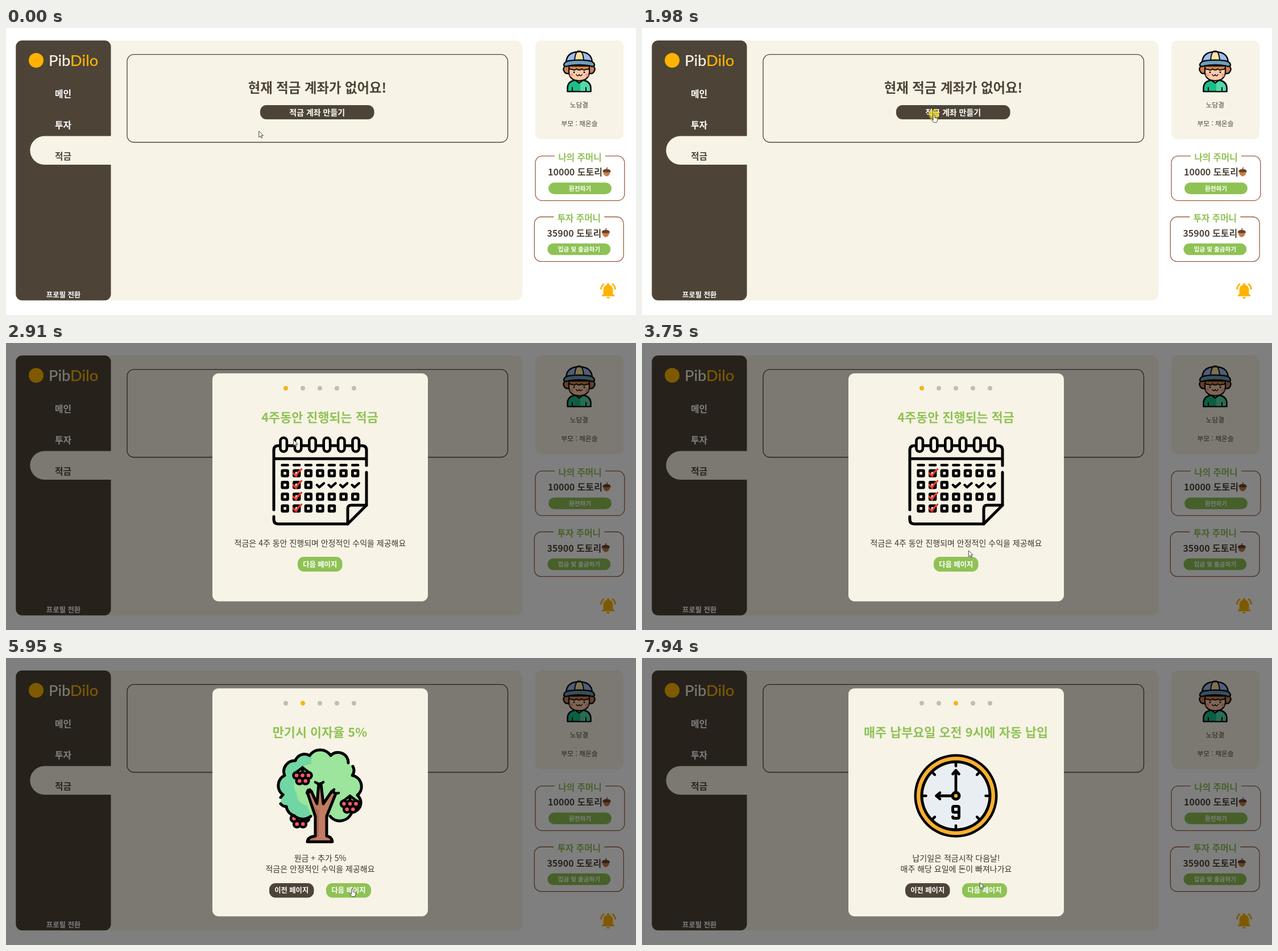
Recreate the animation shown at these times as an HTML page. Size 1108x506 px, loop 8 s.

```html
<!DOCTYPE html>
<html lang="ko">
<head>
<meta charset="utf-8">
<title>적금</title>
<style>
html, body { margin: 0; width: 100%; height: 100%; overflow: hidden; background: #fff; }
svg { display: block; width: 100%; height: 100%; }
text { font-family: "Noto Sans CJK KR", "Noto Sans CJK", sans-serif; text-anchor: middle; }
.logo { font-family: Lato, sans-serif; font-weight: 500; text-anchor: start; }
</style>
</head>
<body>
<svg id="stage" viewBox="0 0 1108 506"></svg>
<script>
const CREAM = '#f7f3e6', DARK = '#4d4437', GREEN = '#8fc255', AMBER = '#ffb300';

const rect = (x, y, x2, y2, r, attrs) =>
  `<rect x="${x}" y="${y}" width="${x2 - x}" height="${y2 - y}" rx="${r}" ${attrs}/>`;
const fill = (x, y, x2, y2, r, color) => rect(x, y, x2, y2, r, `fill="${color}"`);
const circle = (x, y, r, color, more = '') => `<circle cx="${x}" cy="${y}" r="${r}" fill="${color}" ${more}/>`;
const line = (d, w, color = '#000', inside = 'none') =>
  `<path d="${d}" fill="${inside}" stroke="${color}" stroke-width="${w}" stroke-linecap="round" stroke-linejoin="round"/>`;
const shape = (d, color) => `<path d="${d}" fill="${color}"/>`;
// y is the middle of the line of text
const label = (s, x, y, size, color = DARK, weight = 700) =>
  `<text x="${x}" y="${y + size * .38}" font-size="${size}" font-weight="${weight}" fill="${color}">${s}</text>`;
const group = (id, body) => `<g id="${id}">${body}</g>`;

const pill = (s, x, y, x2, y2, color, size) =>
  fill(x, y, x2, y2, Math.min(11, (y2 - y) / 2), color) + label(s, (x + x2) / 2, (y + y2) / 2, size, '#fff');

function acorn(x, y) {
  return shape(`M${x - 6.2} ${y - .5}q0 6.5 6.2 8.5q6.2 -2 6.2 -8.5z`, '#c87d45') +
    shape(`M${x - 7.2} ${y}q0 -5 7.2 -5t7.2 5q-7.2 1.4 -14.4 0z`, '#6a422c') +
    line(`M${x} ${y - 4.5}q0 -2 1 -3`, 1.5, '#6a422c');
}

function pocket(x, y, name, amount, action) {
  return rect(x, y, x + 156.8, y + 78.7, 12, 'fill="none" stroke="#9a5c3e" stroke-width="1.3"') +
    fill(x + 34, y - 3, x + 123, y + 3, 0, '#fff') +
    label(name, x + 78.5, y + 2, 15.6, GREEN) +
    label(amount + ' 도토리', x + 70, y + 28.5, 16) +
    acorn(x + 125.5, y + 28) +
    pill(action, x + 23, y + 46.7, x + 134, y + 67.2, GREEN, 10.6);
}

function avatar() {
  const o = '#0b0b12';
  return line('M987.5 112V105q1 -11 13 -13h15q12 2 13 13v7z', 2.6, o, '#18c087') +
    shape('M1010 94h6q10 2 11 12v5h-17z', '#52d9a6') +
    line('M996 112v-7M1020 112v-7', 2, o) +
    line('M1000 91l8 6 8 -6', 2.4, o, '#fcc9a2') +
    line('M984 66q-6 6 -2 11 2 4 7 3l38 0q5 1 7 -3 4 -5 -2 -11z', 2.4, o, '#d08148') +
    line('M990 70h36v9q-2 14 -18 14t-18 -14z', 2.2, o, '#fdcba8') +
    line('M990 67q0 7 6 6 4 3 7 -1 5 4 10 0 3 4 7 1 6 1 6 -6z', 1.8, o, '#d08148') +
    circle(994.5, 83, 3, '#f9a08f') + circle(1021.5, 83, 3, '#f9a08f') +
    circle(999, 78, 1.5, o) + circle(1017, 78, 1.5, o) +
    line('M1003 82q2.5 5 5 0q2.5 5 5 0', 1.6, o) +
    line('M985 61q1 -19 23 -19t23 19z', 2.4, o, '#9dbff0') +
    line('M1000 60q0 -12 4 -18h8q4 6 4 18z', 2, o, '#fae2a0') +
    line('M981 66q0 -6 8 -8 19 -3 38 0 8 2 8 8 -3 3 -7 1 -20 -4 -40 0 -4 2 -7 -1z', 2.4, o, '#6c9fbb') +
    line('M1005.5 41h5', 2.4, o);
}

function page() {
  return fill(0, 0, 1108, 506, 0, '#fff') +
    fill(17.3, 22, 908.3, 480.3, 12, CREAM) + fill(17.3, 22, 184.5, 480.3, 11, DARK) +
    shape('M185 190.5H67.5a25.2 25.2 0 0 0 0 50.4H185z', CREAM) +
    circle(53, 57, 13, AMBER) +
    `<text class="logo" x="75" y="66.5" font-size="27.3" fill="${CREAM}">Pib<tspan fill="${AMBER}">Dilo</tspan></text>` +
    label('메인', 100.5, 116, 15.8, '#fff') + label('투자', 100.5, 171, 15.8, '#fff') +
    label('적금', 100.5, 226, 15.8) + label('프로필 전환', 101, 470.5, 12.4, '#fff') +
    rect(213, 46.7, 882.5, 201.5, 12, `fill="none" stroke="${DARK}" stroke-width="1.3"`) +
    group('empty', label('현재 적금 계좌가 없어요!', 547.5, 105, 23.4) +
      pill('적금 계좌 만들기', 447, 136, 647.5, 161, DARK, 14)) +
    fill(931, 22, 1086, 196, 10, CREAM) + avatar() +
    label('노담결', 1008, 136, 11.7, DARK, 400) + label('부모 : 채온슬', 1008.5, 168.5, 11.8, DARK, 400) +
    pocket(931, 225.7, '나의 주머니', '10000', '환전하기') +
    pocket(929.3, 333, '투자 주머니', '35900', '입금 및 출금하기') +
    '<g transform="translate(1042.2 446.3) scale(1.4)">' + shape('M7.6 4.1 6.2 2.7A10.3 10.3 0 0 0 2 10.5h2a8.4 8.4 0 0 1 3.6-6.4zM20 10.5h2a10.3 10.3 0 0 0-4.2-7.8l-1.4 1.4a8.4 8.4 0 0 1 3.6 6.4zM18 11c0-3.1-1.6-5.6-4.5-6.3V4a1.5 1.5 0 0 0-3 0v.7C7.6 5.4 6 7.9 6 11v5l-2 2v1h16v-1l-2-2zM12 22a2 2 0 0 0 2-2h-4a2 2 0 0 0 2 2z', AMBER) + '</g>';
}

function calendar() {
  let s = line('M471 294V189q0 -8 8 -8H626q8 0 8 8V216M634 228V286L601 319H479q-8 0 -8 -8V306M471 204H634', 5) +
    line('M601 319V292q0 -6 6 -6H634', 5);
  for (let i = 0; i < 6; i++)
    s += rect(482.5 + i * 25.4, 167, 493.9 + i * 25.4, 191.5, 5.7, `fill="${CREAM}" stroke="#000" stroke-width="4.6"`);
  for (let c = 0; c < 7; c++) {
    const x = 490.6 + c * 20.6;
    s += line(`M${x - 5} 215.3h10`, 4.4);
    for (let r = 0; r < 4; r++) {
      const y = 229.6 + r * 20.7;
      if (r === 3 && c > 4) continue;
      s += r === 1 && c > 2 ? line(`M${x - 5.5} ${y}l4 4 8 -7`, 4.4)
        : rect(x - 4.8, y - 4.8, x + 4.8, y + 4.8, .8, 'fill="none" stroke="#000" stroke-width="4.8"');
      if (c === 1) s += line(`M${x - 6} ${y}l5 5q3 -7 9.5 -12`, 3.2, '#ee3a2c');
    }
  }
  return s;
}

function berries(x, y, stem) {
  const spots = [[-10.5, 0], [0, 0], [10.5, 0], [-5.3, 9.7], [5.3, 9.7]];
  return (stem ? line(`M${x} ${y - 14}L${x - 13} ${y - 4}M${x} ${y - 14}L${x + 13} ${y - 4}M${x} ${y - 14}v8`, 4.6) : '') +
    spots.map(([a, b]) => circle(x + a, y + b, 7.8, '#000')).join('') +
    spots.map(([a, b]) => circle(x + a, y + b, 3.3, '#ff5a68')).join('');
}

function tree() {
  const crown = 'M487 241A20 20 0 0 1 490 207A19 19 0 0 1 509 181A17 17 0 0 1 534 172A22 22 0 0 1 571 172A18 18 0 0 1 602 185';
  const right = 'M610 191A15 15 0 0 1 609 207A20 20 0 0 1 618 242A17 17 0 0 1 608 272A22 22 0 0 1 570 279';
  const left = 'M536 279A22 22 0 0 1 507 278A19 19 0 0 1 493 262';
  return berries(517, 283, false) +
    shape(crown + 'L610 191' + right.slice(8) + 'L536 279' + left.slice(8) + 'L482 257Z', '#9be59d') +
    shape('M487 241A20 20 0 0 1 490 207A19 19 0 0 1 509 181A17 17 0 0 1 534 172L543 166Q535 175 537 187Q520 187 515 204Q500 222 511 238Q512 257 529 260L538 281A22 22 0 0 1 507 278A19 19 0 0 1 493 262L482 257Z', '#70d6a3') +
    line(crown, 5) + line(right, 5) + line(left, 5) + line('M483 246l4 -5M483 257q4 5 10 5', 5) +
    line('M530 324Q531 315 544 314V279L530 237 537 235 547 257 550 222H554L558 257 573 235 580 239 564 279V314Q573 315 574 324Z', 5, '#000', '#c17c62') +
    shape('M547 278l-7 -21 10 14 3 -22 -3 34V314q-4 5 -15 7 3 -4 12 -5z', '#a96a57') +
    line('M529 238l2 -5M537 235l-3 -3M544 219l7 4 7 -4M574 235l3 -3M580 239l5 -1', 4.6) +
    berries(521.5, 207, true) + berries(605, 257, true);
}

function clock() {
  let s = circle(552, 243, 73.5, '#000') + circle(552, 243, 69, '#fbb02f') +
    circle(552, 243, 62.5, '#000') + circle(552, 243, 57.5, '#e9eef3');
  for (let a = 0; a < 360; a += 45)
    s += `<path d="M552 186v4.5" transform="rotate(${a} 552 243)" stroke="#000" stroke-width="4.6" stroke-linecap="round"/>`;
  return s + line('M552 243V199M546.5 204.5L552 198l5.5 6.5M552 243H518M524 237.5L517.5 243l6.5 5.5', 4.8) +
    circle(552, 243, 8.5, '#000') + circle(552, 243, 3.2, '#fbb02f') +
    line('M557 272H549q-2.5 0 -2.5 -2.5V264q0 -2.5 2.5 -2.5H555q2.5 0 2.5 2.5V280q0 2.5 -2.5 2.5H549q-2.5 0 -2.5 -2.5', 5);
}

const heading = s => label(s, 552, 130.5, 21.8, GREEN);
const body = (s, y) => label(s, 552.5, y, 14, '#3c352b', 400);
const pair = pill('이전 페이지', 463, 397, 541.5, 422.5, DARK, 12.3) +
  pill('다음 페이지', 563, 397, 642, 422.5, GREEN, 12.3);

function modal() {
  let dots = '';
  for (let i = 0; i < 5; i++) dots += `<circle class="dot" cx="${492 + i * 30}" cy="79.7" r="4"/>`;
  return fill(0, 0, 1108, 506, 0, 'rgba(0,0,0,.5)') + fill(363, 53.4, 742, 455.5, 11, CREAM) + dots +
    group('page1', heading('4주동안 진행되는 적금') + group('foot',
      body('적금은 4주 동안 진행되며 안정적인 수익을 제공해요', 352.5) +
      pill('다음 페이지', 513, 377, 591.5, 403, GREEN, 12.3))) +
    group('page2', heading('만기시 이자율 5%') + body('원금 + 추가 5%', 352.5) +
      body('적금은 안정적인 수익을 제공해요', 372) + pair) +
    group('page3', heading('매주 납부요일 오전 9시에 자동 납입') + body('납기일은 적금시작 다음날!', 352.5) +
      body('매주 해당 요일에 돈이 빠져나가요', 372) + pair) +
    '<clipPath id="shown"><rect id="loaded" x="460" y="150" width="190" height="0"/></clipPath>' +
    `<g clip-path="url(#shown)">${group('pic1', calendar())}${group('pic2', tree())}${group('pic3', clock())}</g>`;
}

const $ = id => document.getElementById(id);
$('stage').innerHTML = page() + group('modal', modal()) +
  circle(0, 0, 9, '#ffe800', 'id="ring" opacity=".6"') +
  group('arrow', line('M.3 .3V10.6L2.8 8.4 4.5 12 6.2 11.2 4.5 7.7H7.6Z', .9, '#333', '#fff')) +
  group('hand', line('M-1.4 9V1.3a1.4 1.4 0 0 1 2.8 0V5.2l3.4 .8q1.6 .5 1.4 2l-.5 3 -1 2.6H-.3L-3.8 9.8q-.3 -1.8 1.2 -1.3z', .9, '#333', '#fff'));
const dots = document.querySelectorAll('.dot');
const show = (id, on) => { $(id).style.display = on ? '' : 'none'; };
const place = (id, x, y) => $(id).setAttribute('transform', `translate(${x} ${y})`);

// first step, last step, number of steps, points passed
const moves = [
  [190, 390, 4, [459, 192]],
  [720, 1060, 6, [457, 188], [474, 172], [496, 156]],
  [1380, 1450, 2, [513.5, 153]],
  [2450, 2580, 3, [508, 163]],
  [2910, 3690, 12, [500, 186], [548, 232], [611, 290], [575, 348]],
  [3750, 4020, 5, [574, 366], [573, 380], [572, 386], [571, 389], [571, 390]],
  [5550, 5950, 7, [609, 407]],
  [7420, 7940, 8, [602, 392], [597, 388], [594, 396]]
];

function pointer(t) {
  let at = [444.5, 182];
  for (const [from, to, steps, ...points] of moves) {
    if (t < from) break;
    const done = Math.min(steps, 1 + Math.floor((t - from) / (to - from) * (steps - 1) + 1e-6));
    const u = done / steps * points.length, path = [at, ...points];
    const i = Math.min(points.length - 1, Math.floor(u)), k = u - i;
    at = path[i].map((v, j) => v + (path[i + 1][j] - v) * k);
  }
  return at;
}

// button that turns the pointer into a hand
function target(t) {
  if (t < 2120) return [447, 136, 647, 161];
  if (t < 2450) return [513, 210, 591, 236];
  if (t < 4820) return [513, 377, 591, 403];
  return [563, 397, 642, 422];
}

// visible lower edge of the picture while it loads
const loads = [[2120, 150], [2450, 215], [2515, 268], [2580, 340], [4890, 266.5], [4950, 340], [7020, 262], [7090, 340]];

function draw(t) {
  const step = t < 2120 ? 0 : t < 4820 ? 1 : t < 6950 ? 2 : 3;
  const pic = t < 4890 ? 1 : t < 7020 ? 2 : 3;
  show('modal', step > 0);
  show('empty', step === 0);
  for (let i = 1; i < 4; i++) {
    show('page' + i, i === step);
    show('pic' + i, i === pic);
  }
  dots.forEach((d, i) => d.setAttribute('fill', i === step - 1 ? '#f6b31a' : '#c3bdb1'));
  place('foot', 0, t < 2450 ? -167 : 0);
  let edge = 150;
  for (const [at, y] of loads) if (t >= at) edge = y;
  $('loaded').setAttribute('height', edge - 150);

  const [x, y] = pointer(t), [x1, y1, x2, y2] = target(t);
  const over = x >= x1 && x <= x2 && y >= y1 && y <= y2;
  show('hand', over);
  show('arrow', !over);
  place('hand', x, y);
  place('arrow', x, y);
  place('ring', x, y);
  show('ring', t >= 1980 && t < 2120 || t >= 4620 && t < 4820);
}

const start = performance.now();
function tick() {
  draw((performance.now() - start) % 8000);
  requestAnimationFrame(tick);
}
draw(0);
requestAnimationFrame(tick);
</script>
</body>
</html>
```
